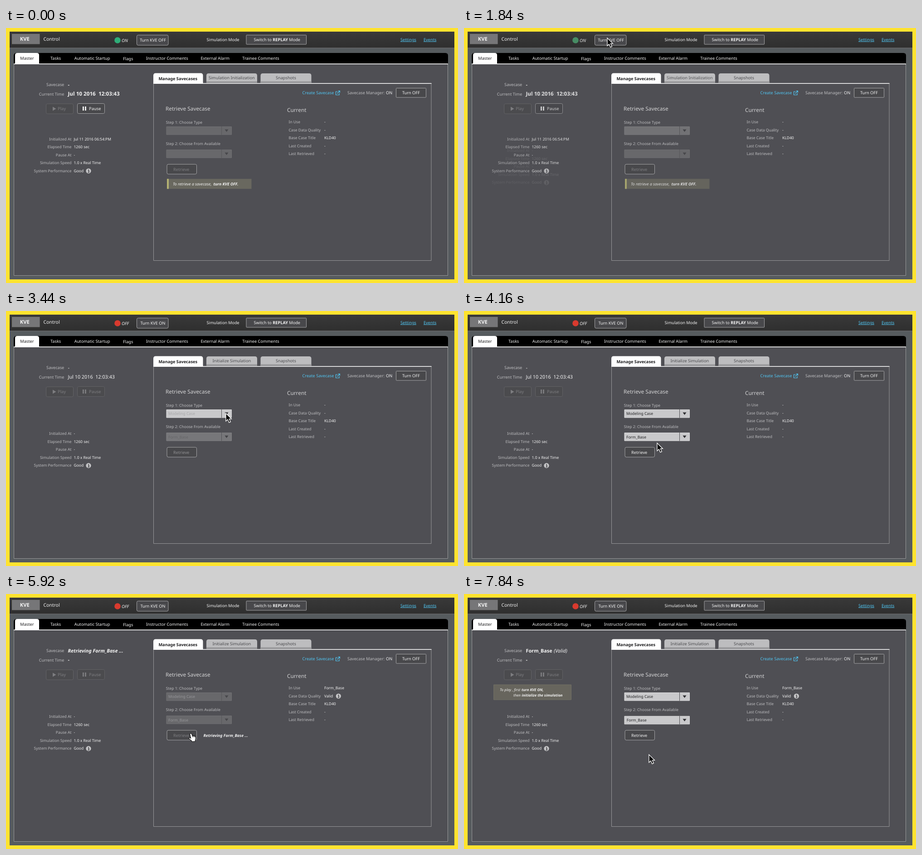
Recreate the animation shown at these times as an HTML page. Size 997x562 px, loop 8000 ms.

```html
<!DOCTYPE html>
<html lang="en">
<head>
<meta charset="utf-8">
<title>Simulation control</title>
<style>
html, body { margin: 0; width: 100%; height: 100%; overflow: hidden; background: #ffe32f; }
svg { display: block; width: 997px; height: 562px; }
text { font: 9.2px "Noto Sans", "Open Sans", sans-serif; fill: #f4f4f4; text-rendering: geometricPrecision; white-space: pre; }
.mid { text-anchor: middle; }
.end { text-anchor: end; }
.soft, .soft text { fill: #bebec0; }
.small text, text.small { font-size: 8.5px; }
.big { font-size: 11.8px; fill: #d4d4d5; }
.value { font-size: 10.8px; }
.b { font-weight: 700; }
.i { font-style: italic; }
.ink { fill: #1d1d1f; }
.tab { fill: #4a4a4d; }
.link { fill: #50c4f0; }
.u { text-decoration: underline; }
.btn { fill: #48484b; stroke: #a4a4a6; }
.off { fill: #4b4b4e; stroke: #626265; }
.dim { fill: #7d7d80; }
.line { fill: none; stroke: #98989a; }
</style>
</head>
<body>
<svg viewBox="0 0 997 562">
  <defs>
    <linearGradient id="bar" x2="0" y2="1">
      <stop stop-color="#393939"/><stop offset="1" stop-color="#2f2f2f"/>
    </linearGradient>
    <g id="info">
      <circle r="5.6" fill="#c6c6c8"/>
      <path d="M-1.2 -.8H.8V3M-1.6 3.1H1.9M0 -3.6V-2.1" fill="none" stroke="#3c3c40" stroke-width="1.4"/>
    </g>
    <g id="select">
      <path d="M.5 .5H144V18H.5Z" fill="#c9c9cb" stroke="#dededf"/>
      <path d="M122 0V18.5" stroke="#4c4c50"/>
      <path d="M129 6.5H137L133 12Z" fill="#2c2c2f"/>
    </g>
    <g id="select-off">
      <path d="M.5 .5H144V18H.5Z" fill="#68686b" stroke="#707073"/>
      <path d="M122 0V18.5" stroke="#56565a"/>
      <path d="M129 6.5H137L133 12Z" fill="#47474b"/>
    </g>
    <g id="stats" class="small">
      <g class="soft end">
        <text x="144.5" y="247.7">Initialized At</text>
        <text x="144.5" y="265.2">Elapsed Time</text>
        <text x="144.5" y="282.7">Pause At</text>
        <text x="144.5" y="300.2">Simulation Speed</text>
        <text x="144.5" y="317.7">System Performance</text>
      </g>
      <text x="149.5" y="265.2">1260 sec</text>
      <text x="149.5" y="282.7">-</text>
      <text x="149.5" y="300.2">1.0 x Real Time</text>
      <text x="149.5" y="317.7">Good</text>
      <use href="#info" x="182" y="315"/>
    </g>
  </defs>

  <!-- frame and header -->
  <path d="M0 0H997V562H0Z" fill="#ffe32f"/>
  <path d="M8 8H989V554H8Z" fill="#565b5e"/>
  <path d="M8 8H989V44H8Z" fill="url(#bar)"/>
  <path d="M8 44H989" stroke="#747476"/>
  <path d="M13 13H74.5V35.5H13Z" fill="#767678"/>
  <text class="mid b" x="41.3" y="28.4" style="font-size:11.2px">KVE</text>
  <text x="82.5" y="28.4" style="font-size:10.4px">Control</text>
  <g data-s="0">
    <circle cx="246" cy="27" r="6.8" fill="#2fad78"/>
    <text class="i" x="255" y="30.6" style="font-size:9.6px">ON</text>
  </g>
  <g data-s="1234">
    <circle cx="246" cy="27" r="6.8" fill="#d93a2e"/>
    <text class="i" x="255" y="30.6" style="font-size:9.6px">OFF</text>
  </g>
  <rect class="btn" x="288.5" y="15.5" width="69.5" height="22.5" rx="3"/>
  <text class="mid" x="324" y="30.4" data-s="0">Turn KVE OFF</text>
  <text class="mid" x="324" y="30.4" data-s="1234">Turn KVE ON</text>
  <text x="442.6" y="29.2" style="font-size:9.05px">Simulation Mode</text>
  <rect class="btn" x="530" y="15.5" width="132.5" height="20.5" rx="1"/>
  <text class="mid" x="597.8" y="29.2">Switch to <tspan class="b">REPLAY</tspan> Mode</text>
  <text class="link u" x="870" y="28.6">Settings</text>
  <text class="link u" x="921" y="28.6">Events</text>

  <!-- main tabs -->
  <path d="M17 79V61Q17 55 23 55H969Q975 55 975 61V79Z"/>
  <path d="M17.5 79V545.5H974.5V79Z" fill="#4f4f54" stroke="#98989a"/>
  <path d="M17 79.3H975" stroke="#fff" stroke-width="1.6"/>
  <path d="M20 79.5V60Q20 55 25 55H68Q73 55 73 60V79.5Z" fill="#fff"/>
  <text class="mid ink" x="46.4" y="70.2">Master</text>
  <text x="98" y="70.2">Tasks</text>
  <text x="150.8" y="70.2">Automatic Startup</text>
  <text x="258" y="71">Flags</text>
  <text x="309" y="70.2">Instructor Comments</text>
  <text x="429.5" y="70.2">External Alarm</text>
  <text x="521.3" y="70.2">Trainee Comments</text>

  <!-- status column -->
  <text class="soft end" x="128.3" y="128.2">Savecase</text>
  <text class="soft end" x="128.3" y="148.8" style="font-size:9px">Current Time</text>
  <text class="value b" x="136.5" y="128.8" data-s="0">-</text>
  <text class="value" x="136.5" y="128.8" data-s="12">-</text>
  <text class="value b i" x="136.5" y="128.8" data-s="3">Retrieving Form_Base ...</text>
  <g data-s="4">
    <text class="value b" x="136.5" y="128.8">Form_Base</text>
    <text class="value i" x="198" y="128.8">(Valid)</text>
  </g>
  <text class="b" x="136.5" y="149.3" style="font-size:11.7px" data-s="0">Jul 10 2016&#160; 12:03:43</text>
  <text class="value" x="136.5" y="149.3" data-s="12">Jul 10 2016&#160; 12:03:43</text>
  <text class="value b" x="136.5" y="149.3" data-s="34">-</text>

  <rect class="off" x="88.5" y="167" width="60" height="22" rx="3"/>
  <path class="dim" d="M103 173.5L110.5 178L103 182.5Z"/>
  <text class="dim" x="114" y="181.3" style="font-size:9.4px">Play</text>
  <g data-s="0">
    <rect class="btn" x="157.5" y="166.5" width="60" height="22" rx="3"/>
    <path d="M169 173H171.8V182H169ZM174 173H176.8V182H174Z" fill="#f4f4f4"/>
    <text x="183" y="180.6" style="font-size:9.4px">Pause</text>
  </g>
  <g data-s="1234">
    <rect class="off" x="157.5" y="166.5" width="60" height="22" rx="3"/>
    <path class="dim" d="M169 173H171.8V182H169ZM174 173H176.8V182H174Z"/>
    <text class="dim" x="183" y="180.6" style="font-size:9.4px">Pause</text>
  </g>
  <g data-s="4">
    <path d="M65.5 200H236.5V233H65.5Z" fill="#67655d" stroke="#727065"/>
    <g style="font-size:8px">
      <text class="i" x="79" y="214.2" style="font-size:8px">To play , first <tspan class="b" x="127">turn KVE ON,</tspan></text>
      <text class="i" x="109" y="225.6" style="font-size:8px">then <tspan class="b" x="127.3">initialize the simulation</tspan></text>
    </g>
  </g>
  <g data-s="0">
    <use href="#stats"/>
    <text class="small" x="149.5" y="247.7">Jul 11 2016 06:54:PM</text>
  </g>
  <g data-s="1234">
    <use href="#stats" y="25.6"/>
    <text class="small" x="149.5" y="273.3">-</text>
  </g>

  <!-- savecase panel -->
  <path class="line" d="M325.5 122V512.5H938V122"/>
  <path d="M325 122.3H938.5" stroke="#fff" stroke-width="1.6"/>
  <path d="M325 122.5V105Q325 99.5 330 99.5H429.5Q434.5 99.5 434.5 105V122.5Z" fill="#fff"/>
  <g id="grey-tab">
    <path d="M442 121V105Q442 100 447 100H549Q554 100 554 105V121Z" fill="#bdbdbf"/>
    <path d="M442 117.5H554V121H442Z" fill="#98989a"/>
  </g>
  <use href="#grey-tab" x="119.5"/>
  <text class="mid ink b" x="379.2" y="114.8">Manage Savecases</text>
  <text class="mid tab" x="497.8" y="113.4" data-s="0">Simulation Initialization</text>
  <text class="mid tab" x="497.8" y="113.4" data-s="1234">Initialize Simulation</text>
  <text class="mid tab" x="617.4" y="113.4">Snapshots</text>

  <text class="link" x="653.5" y="146.4">Create Savecase</text>
  <path d="M731.5 140H727.5V147.5H735V143.5M730.5 144.5L736 139M732.6 138.6H736.4V142.4" fill="none" stroke="#50c4f0" stroke-width="1.2"/>
  <text class="soft" x="753" y="146.4" style="font-size:9.1px">Savecase Manager:</text>
  <text x="838" y="146.4">ON</text>
  <rect class="btn" x="860.5" y="132.5" width="66" height="20.5" rx="1"/>
  <text class="mid" x="893.4" y="146.4">Turn OFF</text>

  <text class="big" x="352" y="182.2">Retrieve Savecase</text>
  <g class="soft small">
    <text x="352.8" y="210.9">Step 1: Choose Type</text>
    <text x="352.8" y="258.4">Step 2: Choose From Available</text>
  </g>
  <use href="#select-off" x="353.5" y="217" data-s="03"/>
  <use href="#select" x="353.5" y="217" data-s="124"/>
  <use href="#select-off" x="353.5" y="268" data-s="013"/>
  <use href="#select" x="353.5" y="268" data-s="2"/>
  <use href="#select" x="353.5" y="268.8" data-s="4"/>
  <g class="small">
    <text class="ink" x="358" y="229.2" data-s="24">Modeling Case</text>
    <text class="ink" x="358" y="280.8" data-s="2">Form_Base</text>
    <text class="ink" x="358.8" y="281.2" data-s="4">Form_Base</text>
    <g data-s="3">
      <text x="358" y="229.2" style="fill:#97979a">Modeling Case</text>
      <text x="358" y="280.8" style="fill:#97979a">Form_Base</text>
    </g>
  </g>
  <rect class="btn" x="355" y="300.3" width="65.5" height="21.7" rx="3"/>
  <text class="dim" x="369" y="314.6" data-s="013">Retrieve</text>
  <text x="369" y="314.6" data-s="24">Retrieve</text>
  <text class="b i" x="435.5" y="314.6" style="font-size:8.7px" data-s="3">Retrieving Form_Base ...</text>
  <g data-s="0">
    <path d="M355 332.5H541.5V354.5H355Z" fill="#69685f"/>
    <path d="M355 332.5H359V354.5H355Z" fill="#b3b172"/>
    <text class="i" x="368" y="346.8" style="font-size:8.7px">To retrieve a savecase, <tspan class="b" x="457.5">turn KVE OFF.</tspan></text>
  </g>

  <text class="big" x="620" y="185.3">Current</text>
  <g class="small">
    <g class="soft">
      <text x="623.5" y="210.2">In Use</text>
      <text x="623.5" y="227.7">Case Data Quality</text>
      <text x="623.5" y="245.2">Base Case Title</text>
      <text x="623.5" y="262.7">Last Created</text>
      <text x="623.5" y="280.2">Last Retrieved</text>
    </g>
    <g data-s="012">
      <text x="702" y="210.2">-</text>
      <text x="702" y="227.7">-</text>
    </g>
    <g data-s="34">
      <text x="702" y="210.2">Form_Base</text>
      <text x="702" y="227.7">Valid</text>
      <use href="#info" x="733.3" y="225"/>
    </g>
    <text x="702" y="245.2">KLD40</text>
    <text x="702" y="262.7">-</text>
    <text x="702" y="280.2">-</text>
  </g>

  <!-- pointer -->
  <circle id="ring" r="35" fill="none" stroke="#fff" stroke-width="2" opacity=".35"/>
  <g id="pointer">
    <path id="arrow" d="M0 0V17.2L4 13.6L7 20.3L10.3 18.9L7.4 12.4H12.4Z" stroke="#fff" stroke-width="1.3"/>
    <path id="hand" d="M3.2 1.6Q4.8 -.4 6.2 1.4L8.2 6.3Q9.6 5 10.8 6.3Q12.4 5.2 13.3 6.9Q15 6.4 15.3 8.4Q16.2 12.5 14.5 15.5L14.3 18.2L7.2 18.9L6.2 16.9L1 12.6Q-.2 10.8 1.3 10.3Q2.6 10.2 4.6 11.6L2.8 3Q2.6 2.2 3.2 1.6ZM8.2 6.3L8.9 9M10.8 6.5L11.4 8.8M13.3 7L13.7 9" fill="#fff" stroke="#111" stroke-width="1.1"/>
  </g>
</svg>
<script>
const LOOP = 8000, STEP = 80;
const $ = id => document.getElementById(id);
const items = [...document.querySelectorAll('[data-s]')];

// Cross-fades between the successive screen states
const fades = [[1800, 2080], [3400, 3600], [5160, 5920], [7060, 7360]];

// Pointer legs: start, end, target x, target y, ease power for x and y
const legs = [
  [560, 1120, 316, 22, 2.4, 2.4],
  [2160, 3040, 485, 225.5, 2.3, 3],
  [3760, 4640, 408, 311, 2.4, 2.4],
  [4640, 4960, 403, 306.5, 2, 2],
  [6560, 6880, 408, 354, 2, 2]
];
const clicks = [1600, 3200, 6880];

const ramp = (t, a, b) => Math.min(1, Math.max(0, (t - a) / (b - a)));
const easeOut = (u, k) => 1 - (1 - u) ** k;

function pointerAt(t) {
  let x = 430, y = 322;
  for (const [a, b, tx, ty, kx, ky] of legs) {
    const u = ramp(t, a, b);
    x += (tx - x) * easeOut(u, kx);
    y += (ty - y) * easeOut(u, ky);
  }
  return [x, y];
}

function draw(t) {
  const p = [1, ...fades.map(([a, b]) => ramp(t, a, b)), 0];
  for (const el of items) {
    let w = 0;
    for (const s of el.dataset.s) w += p[+s] - p[+s + 1];
    el.style.opacity = w;
    el.style.visibility = w > 0 ? 'visible' : 'hidden';
  }

  const [x, y] = pointerAt(t);
  const overButton = t > 3760 && x < 421 && y > 300 && y < 323;
  $('pointer').setAttribute('transform', `translate(${x} ${y})`);
  $('pointer').style.opacity = ramp(t, 0, 320);
  $('arrow').style.display = overButton ? 'none' : '';
  $('hand').style.display = overButton ? '' : 'none';

  const hit = clicks.some(c => t >= c && t < c + STEP);
  $('ring').style.display = hit ? '' : 'none';
  $('ring').setAttribute('transform', `translate(${x} ${y + 2})`);
}

const start = performance.now();
function tick() {
  const t = (performance.now() - start) % LOOP;
  draw(t - t % STEP);
  requestAnimationFrame(tick);
}
tick();
</script>
</body>
</html>
```
